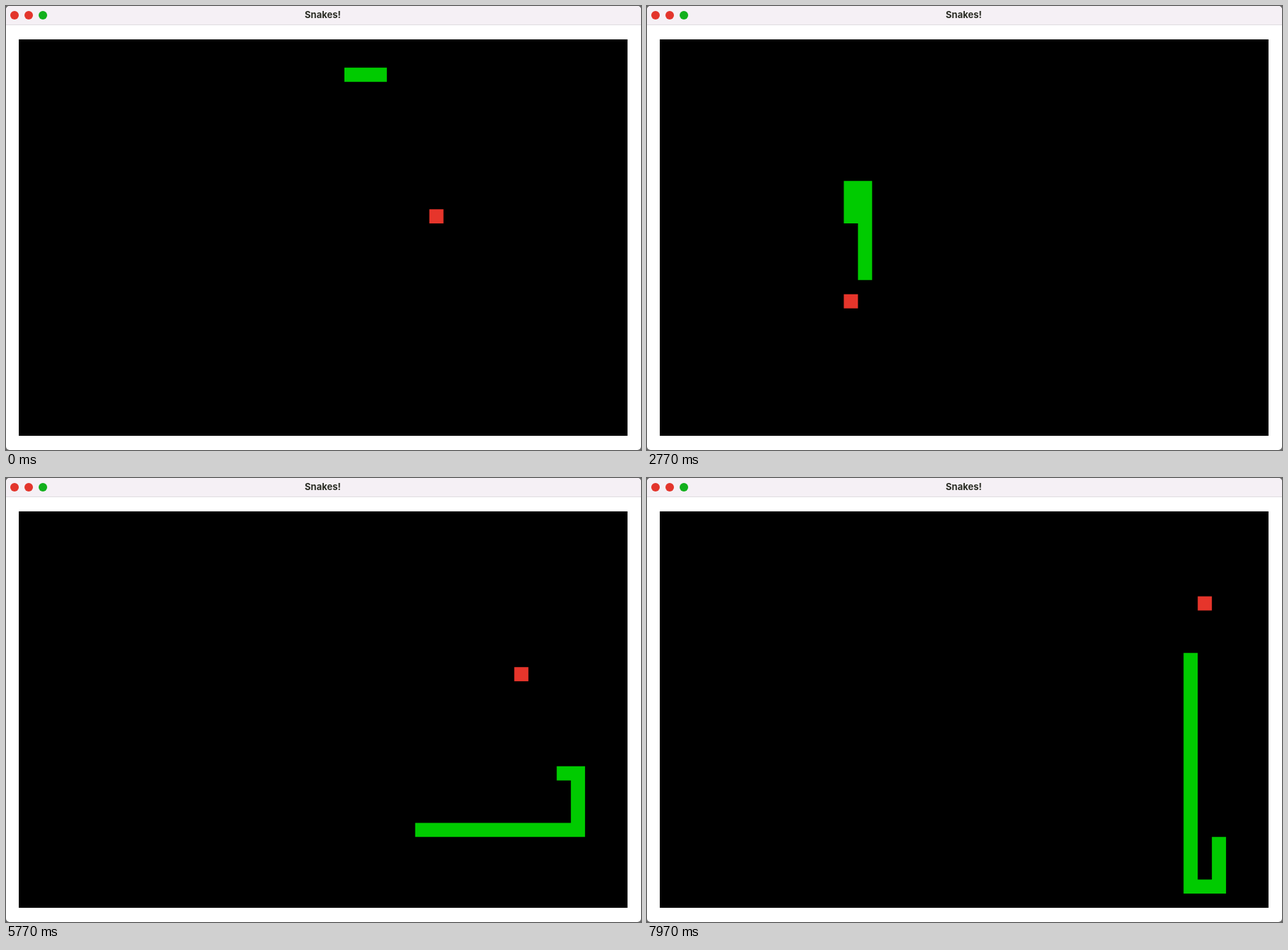
These frames come from a looping animation (895x625 px, 8000 ms). An HTML page with a canvas:

```html
<!DOCTYPE html>
<html lang="en">
<head>
<meta charset="utf-8">
<title>Snakes!</title>
<style>
  html, body { margin: 0; width: 100%; height: 100%; overflow: hidden; background: #666; }
  .window { position: absolute; left: 0; top: 0; width: 895px; height: 625px; background: #fff; border-radius: 5px; overflow: hidden; }
  .bar { position: absolute; left: 0; top: 0; width: 895px; height: 27px; box-sizing: border-box; background: #f5f0f5; border-bottom: 1px solid #dfdce0; }
  .title { position: absolute; left: 0; width: 893px; top: 4px; text-align: center; font: 700 13px/17px Inter, sans-serif; color: #2b2d25; }
  .dot { position: absolute; top: 7px; width: 12px; height: 12px; border-radius: 50%; background: #e3352c; }
  canvas { position: absolute; left: 0; top: 0; }
</style>
</head>
<body>
<div class="window">
  <div class="bar">
    <span class="dot" style="left:6px"></span>
    <span class="dot" style="left:26px"></span>
    <span class="dot" style="left:46px;background:#12b01c"></span>
    <div class="title">Snakes!</div>
  </div>
  <canvas width="895" height="625"></canvas>
</div>
<script>
const LOOP = 8000, TICKS_PER_MS = 0.03;
const START_LENGTH = 3, EXTRA_LIFE = 22;
const BOARD = { x: 18, y: 47, width: 858, height: 558, cols: 43, rows: 28 };
const CELL_W = BOARD.width / BOARD.cols, CELL_H = BOARD.height / BOARD.rows;
const GREEN = '#00cb00', RED = '#e6352b';
const ctx = document.querySelector('canvas').getContext('2d');

// The snake heads for each point in turn, first across and then up or down.
const stops = `22,12 29,19 2,8 32,25 4,24 14,10 13,25 3,8 12,22 21,17 22,23
  31,3 13,22 39,18 35,5 40,9 39,22 30,26 26,4 39,26 37,6 38,6`
  .split(/\s+/).map(pair => pair.split(',').map(Number));

function walk(start, goals) {
  let [x, y] = start;
  const cells = [start];
  for (const [col, row] of goals) {
    while (x !== col) cells.push([x += Math.sign(col - x), y]);
    while (y !== row) cells.push([x, y += Math.sign(row - y)]);
  }
  return cells;
}

const route = walk([25, 2], stops);

// Main meals: cell, and how many bites lead up to it, evenly spread on the way.
const meals = [
  { cell: [29, 12], bites: 1 }, { cell: [7, 25], bites: 4 },
  { cell: [13, 18], bites: 3 }, { cell: [22, 17], bites: 4 },
  { cell: [13, 20], bites: 1 }, { cell: [30, 26], bites: 4 },
  { cell: [38, 6], bites: 3 }
];

// Spare food that vanishes after a while.
const extras = [
  { cell: [23, 8], born: 45 }, { cell: [21, 4], born: 142 }, { cell: [11, 5], born: 190 }
];

function planBites() {
  const indices = [];
  let last = 0;
  for (const { cell: [col, row], bites } of meals) {
    const next = route.findIndex(([x, y], i) => i > last && x === col && y === row);
    for (let i = 1; i <= bites; i++) {
      indices.push(Math.round(last + (next - last) * i / bites));
    }
    last = next;
  }
  return indices;
}

const biteAt = planBites();

function fillCells(cells, color) {
  ctx.fillStyle = color;
  ctx.beginPath();
  for (const [col, row] of cells) {
    ctx.rect(BOARD.x + col * CELL_W, BOARD.y + row * CELL_H, CELL_W, CELL_H);
  }
  ctx.fill();
}

// Two cells per tick, with one quick and one slow tick on the way.
function headIndex(tick) {
  const lead = tick >= 135 && tick < 220 ? 1 : 0;
  return 2 * tick + lead + START_LENGTH - 1;
}

function draw(time) {
  const tick = Math.floor(time * TICKS_PER_MS + 0.11) % (LOOP * TICKS_PER_MS);
  const head = headIndex(tick);
  const eaten = biteAt.filter(index => index <= head).length;
  const spare = extras.filter(({ born }) => tick >= born && tick < born + EXTRA_LIFE);

  ctx.fillStyle = '#000';
  ctx.fillRect(BOARD.x, BOARD.y, BOARD.width, BOARD.height);
  fillCells([route[biteAt[eaten]], ...spare.map(food => food.cell)], RED);
  fillCells(route.slice(head + 1 - START_LENGTH - eaten, head + 1), GREEN);
}

const begin = performance.now();
function frame() {
  draw((performance.now() - begin) % LOOP);
  requestAnimationFrame(frame);
}
frame();
</script>
</body>
</html>
```
